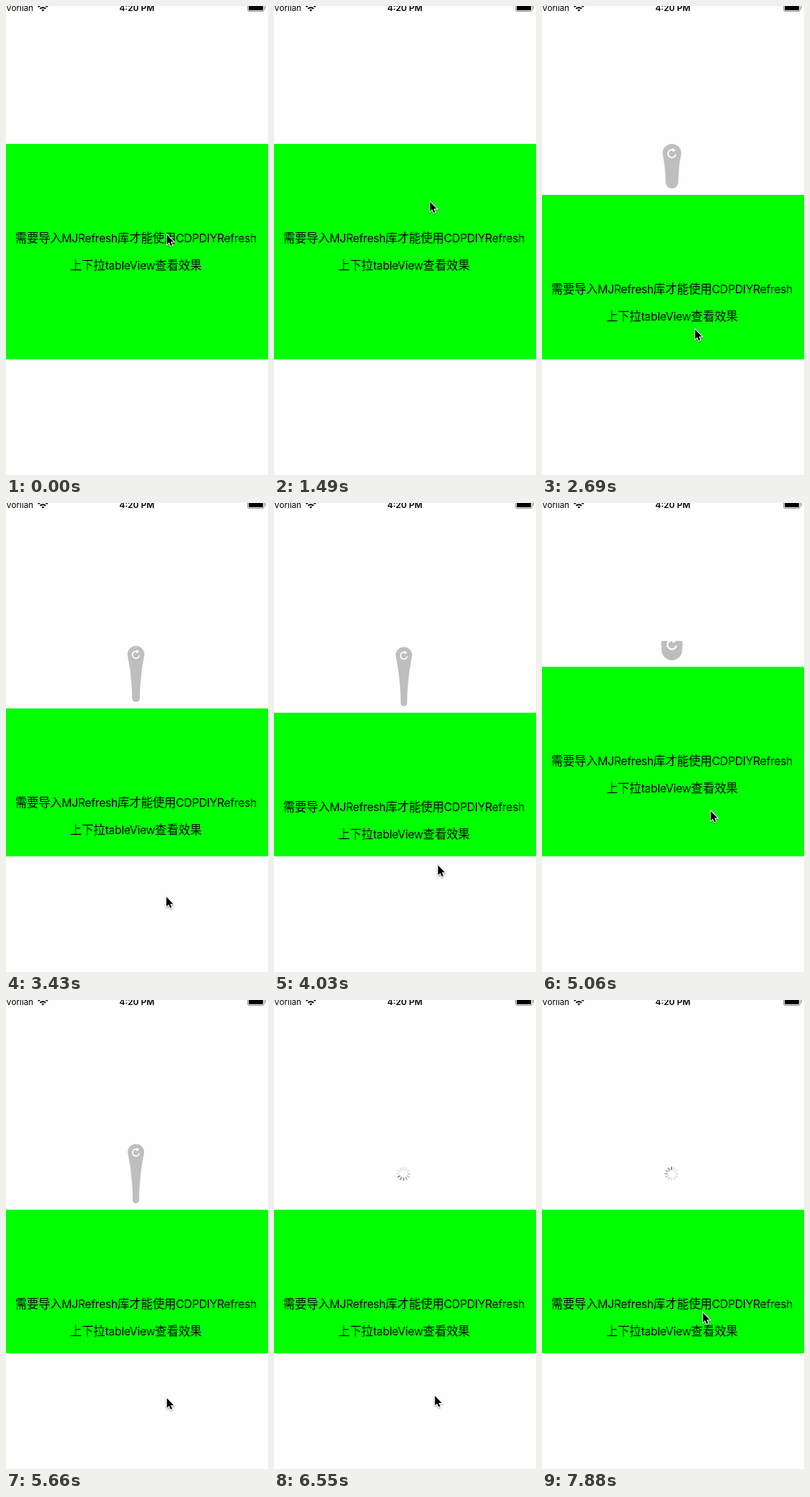
These frames come from a looping animation (366x653 px, 8 s). An HTML page:

```html
<!DOCTYPE html>
<html lang="zh">
<head>
<meta charset="utf-8">
<style>
  html, body { margin: 0; height: 100%; overflow: hidden; background: #fefefe; }
  svg { display: block; width: 366px; height: 653px; }
  text { font: 16.5px "Noto Sans CJK SC", "Noto Sans CJK", sans-serif; letter-spacing: -.2px; }
  .latin { font: 15.8px Inter, sans-serif; letter-spacing: -.32px; }
  .status { font: 11.7px Inter, sans-serif; letter-spacing: 0; }
  .clock { font-size: 12px; font-weight: 600; }
  .label { text-anchor: middle; }
  #cursor { filter: drop-shadow(0 1px 1px #0006); }
</style>
</head>
<body>
<svg viewBox="0 0 366 653">
  <clipPath id="table"><path d="M0 192H366V492H0Z"/></clipPath>

  <text class="status" x="0" y="6.5">Vorlian</text>
  <g fill="none" stroke="#000" stroke-width="2">
    <path d="M45 1.2A9.3 9.3 0 0 1 58 1.2M47.6 3.8A5.6 5.6 0 0 1 55.4 3.8"/>
    <path d="M51.5 7.6L49.6 5.6A2.7 2.7 0 0 1 53.4 5.6Z" fill="#000" stroke="none"/>
  </g>
  <text class="status clock label" x="182.7" y="6.5">4:20 PM</text>
  <rect x="337.5" y="-4" width="23" height="11.5" rx="2.5" fill="none" stroke="#888"/>
  <rect x="339" y="-3" width="20" height="9" rx="1" fill="#000"/>
  <path d="M362 0H363V4H362Z" fill="#888"/>

  <g clip-path="url(#table)">
    <path d="M0 192H366V492H0Z" fill="#0f0"/>
    <g id="content">
      <path d="M0-200H366V0H0Z" fill="#fefefe"/>
      <g id="drop">
        <path id="blob" fill="#bebebe"/>
        <g id="arrow" fill="none" stroke="#fff" stroke-width="2">
          <path d="M5.4 1A5.5 5.5 0 1 1 1.5-5.3"/>
          <path d="M1-8.2L5.4-4.6L.6-2.3Z" fill="#fff" stroke="none"/>
        </g>
      </g>
      <g id="spinner" stroke="#777" stroke-width="2" stroke-linecap="round"/>
      <text class="label" x="181.4" y="137">需要导入<tspan class="latin">MJRefresh</tspan>库才能使用<tspan class="latin">CDPDIYRefresh</tspan></text>
      <text class="label" x="181.4" y="175">上下拉<tspan class="latin">tableView</tspan>查看效果</text>
    </g>
  </g>

  <path id="cursor" d="M0 0V13.4L3.1 10.6L5.2 15.4L7.3 14.5L5.3 9.7H9.5Z"
        stroke="#fff" stroke-width="2" paint-order="stroke"/>
</svg>
<script>
const LOOP = 8000, START = 598, TICK = 148.5;
const GRAB_Y = 281, TABLE_HEIGHT = 300, HEADER = 100, REFRESH_STEP = 37;
const $ = id => document.getElementById(id);

const rest = { x: 224, y: 318 };
const moves = [
  { from: -1, to: 2, x: 217, y: 268 },
  { from: 5, to: 6, x: 217, y: 272 },
  { from: 8, to: 13, x: 213, y: 450 },
  { from: 14, to: 20, x: 224, y: 555 },
  { from: 22.1, to: 25.7, x: 254, y: 207 },
  { from: 25.7, to: 33, x: 224, y: 554 },
  { from: 34, to: 38, x: 224, y: 559 },
  { from: 39, to: 45, x: 224, y: 435 }
];

const clamp = v => Math.min(1, Math.max(0, v));
const ease = k => (1 - Math.cos(Math.PI * clamp(k))) / 2;

function cursorAt(step) {
  return moves.reduce((p, { from, to, x, y }) => {
    const k = ease((step - from) / (to - from));
    return { x: p.x + (x - p.x) * k, y: p.y + (y - p.y) * k };
  }, rest);
}

// Rubber-band resistance; the table trails the hand by one step
function pullAt(step) {
  if (step <= 8) return 0;
  if (step >= REFRESH_STEP) return HEADER;
  const drag = cursorAt(step - 1).y - GRAB_Y;
  const pull = TABLE_HEIGHT * (1 - 1 / (1 + .55 * Math.abs(drag) / TABLE_HEIGHT));
  return step < 11 ? Math.max(0, Math.sign(drag) * pull) : Math.sign(drag) * pull;
}

function drawDrop(pull) {
  const p = clamp((pull - 28) / 72), cx = 181.5;
  const top = 15.5 - 4 * p, bottom = 15.5 - 11 * p;
  const y1 = -25.3 - 54.7 * p, y2 = -9 - bottom, mid = (y1 + y2) / 2;
  $('blob').setAttribute('d',
    `M${cx - top} ${y1}A${top} ${top} 0 0 1 ${cx + top} ${y1}` +
    `Q${cx + bottom} ${mid} ${cx + bottom} ${y2}` +
    `A${bottom} ${bottom} 0 0 1 ${cx - bottom} ${y2}` +
    `Q${cx - bottom} ${mid} ${cx - top} ${y1}Z`);
  $('arrow').setAttribute('transform', `translate(${cx} ${y1 + .5}) scale(${top / 13.2})`);
}

$('spinner').innerHTML = Array.from({ length: 12 }, (_, i) =>
  `<path d="M0-6V-9" transform="translate(181 -50) rotate(${i * 30})"/>`).join('');

function drawSpinner(time) {
  const head = Math.floor(time * 12 / 1000) + 2;
  [...$('spinner').children].forEach((tick, i) => {
    const age = (head - i + 120) % 12;
    tick.setAttribute('opacity', Math.max(.2, .85 - age * .11));
  });
}

function frame(time) {
  const step = Math.max(-1, Math.floor((time % LOOP - START) / TICK));
  const { x, y } = cursorAt(step), pull = pullAt(step);
  const refreshing = step >= REFRESH_STEP;
  $('cursor').setAttribute('transform', `translate(${x + .8} ${y + .5})`);
  $('content').setAttribute('transform', `translate(0 ${192 + Math.round(pull)})`);
  $('drop').style.display = refreshing ? 'none' : '';
  $('spinner').style.display = refreshing ? '' : 'none';
  drawDrop(pull);
  drawSpinner(START + step * TICK);
}

const begin = performance.now();
function loop() {
  frame(performance.now() - begin);
  requestAnimationFrame(loop);
}
loop();
</script>
</body>
</html>
```
